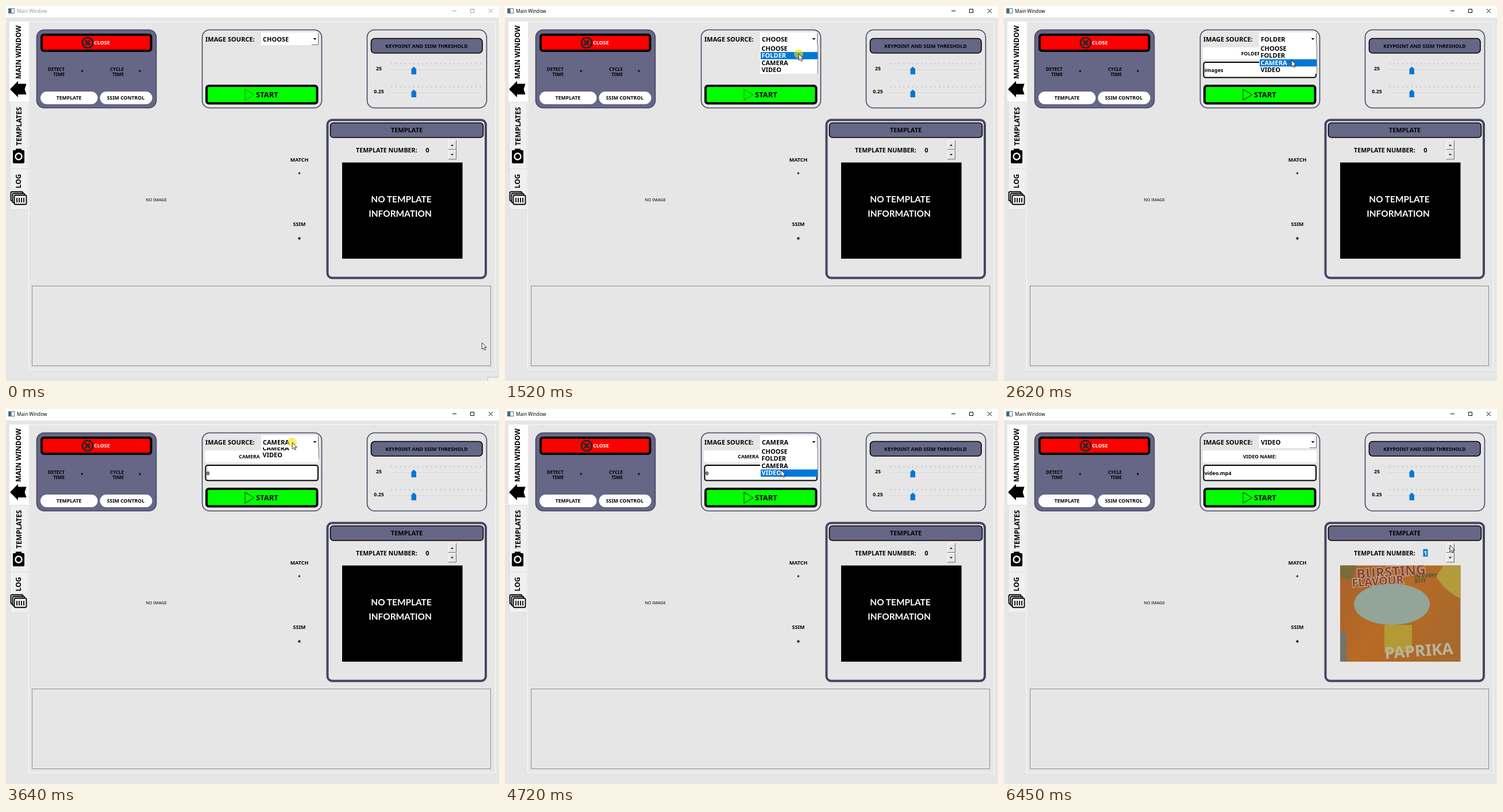
Write an HTML page that moves like this. It is 858 by 653 pixels and loops after 6.65 s.

```html
<!DOCTYPE html>
<html lang="en">
<head>
<meta charset="utf-8">
<title>Main Window</title>
<style>
  html, body { margin: 0; width: 100%; height: 100%; overflow: hidden; background: #e6e6e6; }
  svg { display: block; width: 858px; height: 653px; font: bold 9px "Noto Sans", sans-serif; }
  .s8 { font-size: 8px; }
  .s87 { font-size: 8.7px; }
  .s11 { font-size: 11px; }
  .s12 { font-size: 12px; }
  .mid { text-anchor: middle; }
  .end { text-anchor: end; }
  .panel { fill: none; stroke: #454563; stroke-width: 1.6; }
  .button { stroke: #000; stroke-width: 4; }
  .header { fill: #666687; stroke: #000; stroke-width: 1.6; }
  .white { fill: #fff; }
  .shade { fill: none; stroke: #696969; }
</style>
</head>
<body>
<svg viewBox="0 0 858 653">
  <defs>
    <linearGradient id="orange" x2="1" y2=".5">
      <stop offset="0" stop-color="#a5622a"/>
      <stop offset=".5" stop-color="#b96a24"/>
      <stop offset="1" stop-color="#a8692c"/>
    </linearGradient>
    <clipPath id="photoClip"><rect x="585" y="272.5" width="209.5" height="167.5"/></clipPath>
    <clipPath id="popupClip"><rect id="popupWindow" x="444" y="67" width="101"/></clipPath>
    <g id="slider">
      <path id="ticks" stroke="#b4b4b4" fill="none"/>
      <path d="M668 111.5H829" stroke="#d2d2d2" fill="none"/>
      <path d="M668 112.5H829" stroke="#f0f0f0" fill="none"/>
      <path d="M705.5 119V109.5L709.7 105.5L714 109.5V119Z" fill="#0078d7"/>
    </g>
  </defs>

  <rect width="858" height="653" fill="#e6e6e6"/>
  <rect class="white" width="858" height="20"/>
  <rect x="4.5" y="4.5" width="10" height="8" fill="#fff" stroke="#66717a"/>
  <rect x="5" y="5" width="4.5" height="7" fill="#2f6f86"/>
  <g id="titleBar">
    <text x="19" y="12" font-weight="400" font-size="8.2">Main Window</text>
    <path d="M777 8.5H784M808.5 5.5H814.5V11.5H808.5ZM840 5L847 12M847 5L840 12" fill="none" stroke="currentColor"/>
  </g>

  <!-- side tabs -->
  <path d="M39.5 633V27.5H851M39.5 633.2H851.5V27" fill="none" stroke="#fafafa"/>
  <rect class="white" x="6" y="27" width="34" height="140"/>
  <path d="M7.5 167.5H38.5V354.5H7.5ZM7 283.5H38" fill="#f0f0f0" stroke="#dcdcdc"/>
  <g class="s12 mid">
    <text transform="translate(26 80.5) rotate(-90)">MAIN WINDOW</text>
    <text transform="translate(26.5 209.5) rotate(-90)">TEMPLATES</text>
    <text transform="translate(26 305) rotate(-90)">LOG</text>
  </g>
  <path d="M7 145L21 130.5V135.5H35.5L32.5 145L35.5 154H21V159Z"/>
  <rect x="12" y="251" width="20" height="23" rx="2"/>
  <rect x="17" y="248.5" width="10" height="4"/>
  <circle cx="22" cy="262" r="5.5" stroke="#fff" stroke-width="2.4"/>
  <g stroke="#000" stroke-width="1.8" fill="#f0f0f0">
    <rect x="8.5" y="323.5" width="21" height="16" rx="2"/>
    <rect x="11.5" y="326.5" width="21" height="16" rx="2"/>
    <rect x="14.5" y="329.5" width="21" height="16" rx="2"/>
    <path d="M19 334V342M23 334V342M27 334V342M31 334V342"/>
  </g>

  <!-- control panel -->
  <rect class="panel" x="53.5" y="41.5" width="208" height="136" rx="13" style="fill:#666687"/>
  <rect class="button" x="62" y="50" width="190.5" height="28" rx="4" fill="#f00"/>
  <circle cx="142" cy="64" r="9" fill="none" stroke="#302222" stroke-width="3"/>
  <path d="M138 60L146 68M146 60L138 68" stroke="#302222" stroke-width="3.4"/>
  <text class="white" x="153" y="67.3">CLOSE</text>
  <g class="s8 end">
    <text x="102" y="113">DETECT</text><text x="102" y="122">TIME</text>
    <text x="205" y="113">CYCLE</text><text x="205" y="122">TIME</text>
    <text x="134.5" y="118">*</text><text x="235" y="118">*</text>
  </g>
  <rect class="white" x="60" y="149" width="99.5" height="22" rx="11"/>
  <rect class="white" x="163.5" y="149" width="91" height="22" rx="11"/>
  <g class="s87 mid">
    <text x="109.5" y="163.3">TEMPLATE</text>
    <text x="208.5" y="163.3">SSIM CONTROL</text>
  </g>

  <!-- image source panel -->
  <rect class="panel" x="341.5" y="41.5" width="208" height="136" rx="13"/>
  <text class="s11" x="347" y="61.5">IMAGE SOURCE:</text>
  <rect class="white" x="444" y="46" width="100" height="22"/>
  <text class="s11" id="source" x="447" y="61.5"></text>
  <path class="shade" d="M532 67.5H543.5V47"/>
  <path d="M534.5 56H540.5L537.5 59Z"/>
  <g id="fields">
    <rect class="white" x="346" y="72" width="198" height="21" rx="3"/>
    <text class="s87 mid" id="fieldLabel" x="445" y="86"></text>
    <rect x="347.5" y="98" width="195.5" height="26.5" rx="3.5" fill="#fff" stroke="#000" stroke-width="2"/>
    <text id="fieldValue" x="349" y="114.5"></text>
  </g>
  <rect class="button" x="349" y="139" width="192.5" height="30.5" rx="4" fill="#0f0"/>
  <path id="play" d="M416 145V164L432 154.5Z" fill="none"/>
  <text x="435" y="159.3" font-size="13">START</text>

  <!-- threshold panel -->
  <rect class="panel" x="628.5" y="41.5" width="208" height="136" rx="13"/>
  <rect class="header" x="635.5" y="56.5" width="193.5" height="25.5" rx="6"/>
  <g class="s87 mid">
    <text x="732" y="72.5">KEYPOINT AND SSIM THRESHOLD</text>
    <text x="649" y="112">25</text>
    <text x="649" y="152">0.25</text>
  </g>
  <use href="#slider"/>
  <use href="#slider" y="40"/>

  <!-- results -->
  <text class="mid" x="261.5" y="339.5" font-weight="400" font-size="7.4">NO IMAGE</text>
  <g class="mid">
    <text x="510.5" y="271">MATCH</text>
    <text x="510.5" y="296" class="s8">*</text>
    <text x="510.5" y="382.7">SSIM</text>
    <text x="510.5" y="410" class="s11">*</text>
  </g>
  <rect x="45.5" y="487.5" width="798" height="139" fill="none" stroke="#8c8c8c"/>

  <!-- template panel -->
  <rect class="panel" x="559.5" y="198.5" width="275.5" height="275" rx="8" style="stroke-width:4"/>
  <rect class="header" x="564.5" y="203.5" width="266" height="25.5" rx="5"/>
  <text class="s11 mid" x="697.5" y="220">TEMPLATE</text>
  <text x="609" y="255" font-size="10.7">TEMPLATE NUMBER:</text>
  <rect id="numberMark" x="729.5" y="244" width="8" height="13" fill="#0078d7"/>
  <text class="s11 mid" id="number" x="733.5" y="255"></text>
  <path d="M770.5 249V234.5H783M770.5 266V251.5H783" fill="none" stroke="#fff"/>
  <path class="shade" d="M770 249.8H783.5V234M770 266.8H783.5V251"/>
  <path d="M774 243.5H779L776.5 241ZM774 257.8H779L776.5 260.3Z"/>
  <g id="noTemplate">
    <rect x="585" y="272.5" width="209.5" height="167.5"/>
    <g class="mid" fill="#fff" style="font:bold 15.4px Lato,sans-serif">
      <text x="688" y="342">NO TEMPLATE</text>
      <text x="686" y="366.5">INFORMATION</text>
    </g>
  </g>
  <g id="photo" clip-path="url(#photoClip)">
    <rect x="585" y="272" width="210" height="168" fill="url(#orange)"/>
    <path d="M765 272H795V330Q768 318 752 292Z" fill="#b39a3c"/>
    <path d="M585 272H612L606 300L585 292Z" fill="#7c6c3a"/>
    <path d="M585 388L594 384L597 440H585Z" fill="#70756c"/>
    <g fill="#8a4136" stroke="#c2b294" stroke-width="2.5" paint-order="stroke">
      <text transform="translate(614 296) rotate(-4)" font-size="23.5">BURSTING</text>
      <text transform="translate(606 310) rotate(-4)" font-size="19.5">FLAVOUR</text>
    </g>
    <g fill="#3d5a3c">
      <text transform="translate(714 295) rotate(-4)">IN EVERY</text>
      <text transform="translate(715 303) rotate(-4)">BITE</text>
    </g>
    <ellipse cx="675" cy="340" rx="66" ry="36" fill="#93a598"/>
    <rect x="662" y="376" width="48" height="48" fill="#b39a34"/>
    <text transform="translate(663 435) rotate(-4)" font-size="27.8" fill="#b9b49e">PAPRIKA</text>
  </g>

  <!-- drop-down list -->
  <g id="popup" clip-path="url(#popupClip)">
    <g id="popupBody">
      <rect class="white" x="444" y="67" width="100" height="51"/>
      <path d="M544.3 118V67" stroke="#777"/>
      <rect id="rowMark" x="445" width="99" height="12.6" fill="#0078d7"/>
      <g class="s11" id="rows"></g>
    </g>
  </g>

  <rect id="corner" x="838.5" y="646.5" width="24" height="12" fill="#f2f2f2" stroke="#c0c0c0"/>
  <g id="cursor">
    <circle id="click" r="8" fill="#f5e400" opacity=".6"/>
    <path d="M.3 .3V11.7L2.9 9.3L4.7 13.2L6.6 12.3L4.9 8.5H8.3Z" fill="#fff" stroke="#000" stroke-width=".8"/>
  </g>
</svg>
<script>
const LOOP = 6650;
const ROW_TOP = 67.5, ROW_STEP = 12.6, POPUP_HEIGHT = 51, ROLL_TIME = 150;
const ITEMS = ["CHOOSE", "FOLDER", "CAMERA", "VIDEO"];

// Screen updates: first time, last time, number of evenly spaced steps.
const BURSTS = [
  [0, 0, 1], [70, 690, 10], [760, 760, 1], [900, 1320, 7], [1520, 1990, 6],
  [2140, 2690, 9], [2890, 3440, 8], [3570, 4190, 10], [4390, 4390, 1],
  [4720, 4790, 2], [4990, 5630, 10], [5700, 6310, 8], [6380, 6450, 2]
];
// Pointer path: time, x, y.
const PATH = [
  [0, 828, 586], [690, 540, 65], [760, 534, 61], [900, 534, 61], [970, 529, 66],
  [1320, 512, 83], [1520, 511, 83], [1990, 511, 60], [2140, 511, 60],
  [2690, 499, 96], [2890, 499, 96], [3440, 498, 58], [3640, 498, 58],
  [4190, 480, 100], [4390, 480, 102], [4720, 480, 106], [4790, 480, 108],
  [4990, 480, 108], [5490, 766, 207], [5630, 775, 217], [6170, 776, 237]
];
const CLICKS = [[900, 960], [1520, 1590], [2140, 2200], [2890, 2960], [3570, 3700], [4990, 5050], [6310, 6440]];
const POPUPS = [[870, 1590], [2130, 2950], [3580, 5050]];
const CHOICES = [
  { from: 0, item: 0 },
  { from: 1590, item: 1, label: "FOLDER NAME:", value: "images" },
  { from: 2950, item: 2, label: "CAMERA NUMBER:", value: "0" },
  { from: 5050, item: 3, label: "VIDEO NAME:", value: "video.mp4" }
];

const el = id => document.getElementById(id);
const set = (id, name, value) => el(id).setAttribute(name, value);
const show = (id, visible) => set(id, "visibility", visible ? "visible" : "hidden");
const during = (spans, t) => spans.find(([from, to]) => t >= from && t < to);

set("ticks", "d", Array.from({ length: 21 }, (_, i) => `M${671 + i * 7.75} 99V102`).join(""));
const rows = ITEMS.map((name, i) => {
  const row = document.createElementNS("http://www.w3.org/2000/svg", "text");
  row.textContent = name;
  row.setAttribute("x", 446.5);
  row.setAttribute("y", ROW_TOP + i * ROW_STEP + 10);
  return el("rows").appendChild(row);
});

function snap(t) {
  const [start, end, steps] = BURSTS.findLast(burst => burst[0] <= t);
  if (t >= end) return end;
  const step = (end - start) / (steps - 1);
  return start + Math.floor((t - start) / step + 0.01) * step;
}

function pointerAt(t) {
  const next = PATH.findIndex(point => point[0] > t);
  if (next < 0) return PATH.at(-1).slice(1);
  const [t0, x0, y0] = PATH[next - 1], [t1, x1, y1] = PATH[next];
  const p = (t - t0) / (t1 - t0), eased = p * p * (3 - 2 * p);
  return [x0 + (x1 - x0) * eased, y0 + (y1 - y0) * eased];
}

function drawPopup(t, pointerY, current) {
  const span = during(POPUPS, t);
  show("popup", span);
  if (!span) return;
  const open = Math.min(1, (t - span[0]) / ROLL_TIME);
  const height = Math.round(open * POPUP_HEIGHT);
  set("popupWindow", "height", height);
  set("popupBody", "transform", `translate(0 ${height - POPUP_HEIGHT})`);
  const hovered = Math.floor((pointerY - ROW_TOP) / ROW_STEP);
  const marked = open < 1 ? -1 : hovered < 0 ? current : Math.min(hovered, 3);
  set("rowMark", "y", ROW_TOP + marked * ROW_STEP);
  set("rowMark", "opacity", marked < 0 ? 0 : 1);
  rows.forEach((row, i) => row.setAttribute("fill", i === marked ? "#fff" : "#000"));
}

function draw(time) {
  const t = snap(time % LOOP);
  const [x, y] = pointerAt(t);
  const choice = CHOICES.findLast(c => t >= c.from);
  const active = t >= 900, loaded = t >= 6300;

  set("titleBar", "fill", active ? "#000" : "#999");
  set("titleBar", "color", active ? "#000" : "#999");
  show("corner", t < 70);

  el("source").textContent = ITEMS[choice.item];
  show("fields", choice.item > 0);
  el("fieldLabel").textContent = choice.label || "";
  el("fieldValue").textContent = choice.value || "";
  set("play", "stroke", choice.item ? "#002800" : "#33803a");

  el("number").textContent = loaded ? "1" : "0";
  set("number", "fill", loaded ? "#fff" : "#000");
  show("numberMark", loaded);
  show("photo", loaded);
  show("noTemplate", !loaded);

  drawPopup(t, y, choice.item);
  set("cursor", "transform", `translate(${Math.round(x)} ${Math.round(y)})`);
  show("click", during(CLICKS, t));
}

const began = performance.now();
function tick() {
  draw(performance.now() - began);
  requestAnimationFrame(tick);
}
tick();
</script>
</body>
</html>
```
